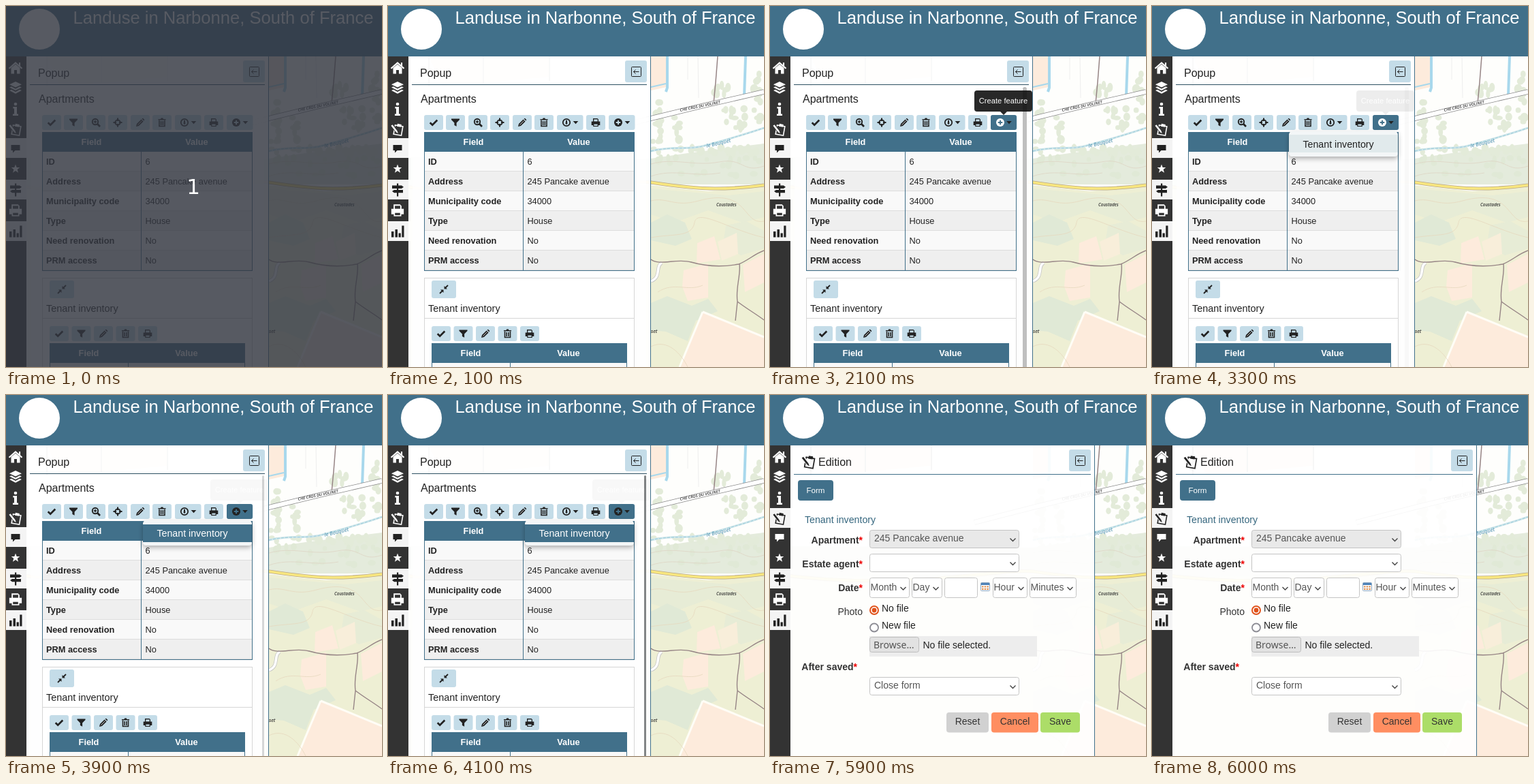
Recreate the animation shown at these times as an HTML page. Size 552 by 530 pixels, loop 8000 ms.

```html
<!DOCTYPE html>
<html lang="en">
<head>
<meta charset="utf-8">
<title>Tenant inventory form</title>
<style>
html, body { margin: 0; width: 100%; height: 100%; overflow: hidden; background: #fff; }
svg { display: block; width: 100%; height: 100%; font-family: "Liberation Sans", Arial, sans-serif; }
</style>
</head>
<body>
<svg id="stage" viewBox="0 0 552 530"></svg>
<script>
const BLUE = '#41708a', PALE = '#c4dce8', INK = '#222', SIDE = '#333';
const LOOP = 8000, STEP = 100;
const ADDRESS = '245 Pancake avenue';

let seed = 7;
const rand = () => (seed = seed * 16807 % 2147483647) / 2147483647;

const rect = (x, y, x2, y2, fill, extra = '') =>
  `<rect x="${x}" y="${y}" width="${x2 - x}" height="${y2 - y}" fill="${fill}" ${extra}/>`;
const frame = (x, y, x2, y2, fill, stroke, r = 0) =>
  rect(x + .5, y + .5, x2 - .5, y2 - .5, fill, `stroke="${stroke}" rx="${r}"`);
const text = (s, x, y, size, fill = INK, extra = '') =>
  `<text x="${x}" y="${y}" font-size="${size}" fill="${fill}" ${extra}>${s}</text>`;
const area = (d, fill) => `<path d="${d}" fill="${fill}"/>`;
const line = (d, color, w = 1, extra = '') =>
  `<path d="${d}" fill="none" stroke="${color}" stroke-width="${w}" ${extra}/>`;
const group = (id, body, extra = '') => `<g id="${id}" ${extra}>${body}</g>`;
const BOLD = 'font-weight="bold"', MID = 'text-anchor="middle"', END = 'text-anchor="end"';

// Icons are drawn around 0,0; c is the ink, b the colour behind it
const icons = {
  check: c => line('M-5.3 .2L-1.8 3.6L5.3-3.5', c, 2.7),
  filter: c => area('M-6-5.5H6V-4L1.6 .6V5.8L-1.6 4V.6L-6-4Z', c),
  zoom: c => line('M2 2L6 6', c, 2.6) + `<circle cx="-1" cy="-1" r="4.2" fill="none" stroke="${c}" stroke-width="1.9"/>` +
    line('M-3.2-1H1.2M-1-3.2V1.2', c, 1.4),
  target: c => `<circle r="3.7" fill="none" stroke="${c}" stroke-width="1.8"/>` +
    line('M-6.5 0H-2M2 0H6.5M0-6.5V-2M0 2V6.5', c, 2),
  pencil: c => area('M-6 6L-5 2L1.6-4.6L4.6-1.6L-2 5ZM2.5-5.4L4-6.3L6.3-4L5.4-2.5Z', c) + line('M-3.6 3.6L2.4-2.4', '#fff', .8),
  trash: c => area('M-5.5-5H-2L-1.4-6.4H1.4L2-5H5.5V-3.5H-5.5Z', c) +
    line('M-4-3V5.5H4V-3M-1.4-2V4M1.4-2V4', c, 1.6),
  clock: c => `<circle r="5.2" fill="none" stroke="${c}" stroke-width="1.8"/>` +
    line('M0-3.2V2', c, 2) + area('M-2 .5H2L0 3.2Z', c),
  print: (c, b) => area('M-4-6H2.5L4-4.5V-1H-4ZM-6.3-1.5H6.3V4H-6.3Z', c) +
    rect(-2.7, -4.6, 2.7, -1.6, b) + rect(-3.8, 1.8, 3.8, 6, c) + rect(-2.6, 2.6, 2.6, 4.9, b),
  plus: (c, b) => `<circle r="6" fill="${c}"/>` + line('M-3.3 0H3.3M0-3.3V3.3', b, 1.9),
  caret: c => area('M-3.8-2H3.8L0 2.2Z', c),
  shrink: c => line('M-6 6L-2 2M6-6L2-2', c, 1.8) + area('M-5 .5H-.5V5ZM5-.5H.5V-5Z', c),
  home: c => line('M-9.5 .8L0-7.6L9.5 .8M6-8V-3', c, 2.1) +
    area('M-6.5 0L0-5.5L6.5 0V8.5H2V3H-2V8.5H-6.5Z', c),
  layers: c => area('M0-9L9-4.7L0-.4L-9-4.7Z', c) +
    area('M-9-.6L-6-1.8L0 1.4L6-1.8L9-.6L0 4ZM-9 4L-6 2.8L0 6L6 2.8L9 4L0 8.8Z', c),
  info: c => `<circle cy="-8" r="2.3" fill="${c}"/>` + area('M-3.6-4H2V6.5H4V9H-4V6.5H-2V-1.6H-3.6Z', c),
  edit: (c, b) => `<g transform="rotate(10)">${line('M-4.5-5.5H7V8H-4.5Z', c, 1.6) + rect(-1.5, -8, 4.5, -4, c)}</g>` +
    line('M-8.5-6.5L.5 5', b, 4.6) + line('M-8.5-6L-1.5 3', c, 2.6) + area('M-2.6 3.9L-.4 2.2L.8 6Z', c),
  comment: c => area('M-6.5-5H6.5V3H-.5L-4 6.5V3H-6.5Z', c),
  star: c => area('M0-6.5L1.7-2H6.3L2.7 .9L4 5.7L0 2.9L-4 5.7L-2.7 .9L-6.3-2H-1.7Z', c),
  sign: c => rect(-1, -9.5, 1.2, 9.5, c) + area('M-8-6.5H6L9-4.3L6-2H-8ZM8 0H-5L-8 2L-5 4.2H8Z', c),
  bars: c => rect(-9, 0, -5.5, 8.5, c) + rect(-3.5, -3, 0, 8.5, c) + rect(1.5, 2.5, 4.8, 8.5, c) + rect(6.3, -8.5, 9.5, 8.5, c)
};
const icon = (name, x, y, c = INK, b = PALE, k = 1) =>
  `<g transform="translate(${x} ${y}) scale(${k})">${icons[name](c, b)}</g>`;

const trees = (x, y, w, h, n, fill) => Array.from({ length: n }, () =>
  `<ellipse cx="${(x + rand() * w).toFixed(1)}" cy="${(y + rand() * h).toFixed(1)}" rx="${(3 + rand() * 3).toFixed(1)}" ry="${(3 + rand() * 4).toFixed(1)}" fill="${fill}"/>`).join('');

function map() {
  const green = '#e0e9d6', leaf = '#e3ebd9', peach = '#fdebdc', brown = '#968485';
  const yellow = 'M0 262C200 290 330 254 386 259C420 264 450 268 480 268S530 266 552 263';
  const street = 'M300 187L386 165L460 147L552 126';
  const stream = 'M386 213C420 205 440 212 465 205S520 190 552 179';
  const label = (s, x, y, a, size, fill) =>
    text(s, x, y, size, fill, `font-family="Open Sans, sans-serif" font-style="italic" font-weight="600" transform="rotate(${a} ${x} ${y})"`);
  return rect(0, 74, 552, 530, '#fefefc') +
    area('M386 74H409V119L386 124Z', peach) +
    area('M60 74H236V104L80 118Z', peach) +
    line('M237 74V110M60 74V118M140 74V113', '#9a9a9a', 2) +
    area('M0 222L386 224L440 216L552 202V262L386 262L0 270Z', '#e4ebdc') +
    area('M0 268L386 263L470 272L552 264V530H0Z', '#eeefd4') +
    area('M386 268L440 273L500 278L552 272V310L520 318L470 300L420 318L386 306Z', '#e7ecd6') +
    area('M386 318L410 306L436 318L446 342L422 352L386 344Z', green) +
    area('M386 436L410 426L446 440L470 430L484 448L452 462L440 492L408 478L386 476Z', green) +
    area('M496 322L526 316L552 330V356L518 366L492 350Z', '#e7ecd6') +
    area('M454 348L479 338L488 372L453 378Z', peach) +
    area('M484 346L512 333L514 364L490 374Z', '#f8eeda') +
    area('M434 388L470 378V428L440 433L432 412Z', peach) +
    area('M521 380L552 364V406L524 420Z', peach) +
    area('M462 449L552 484V530H430Z', peach) +
    line('M462 449L552 486M462 449L428 530', '#fffdf6', 3) +
    trees(389, 138, 12, 66, 18, leaf) + trees(420, 164, 8, 36, 9, leaf) +
    trees(478, 116, 24, 14, 9, leaf) + trees(535, 98, 13, 76, 14, leaf) +
    trees(490, 150, 34, 30, 16, leaf) + trees(390, 208, 158, 10, 26, leaf) +
    trees(392, 222, 154, 28, 20, green) +
    line('M410 74V120L408 126M525 74L523 131', '#a8d8ec', 4) +
    line('M386 119L408 114', '#a8d8ec', 2) +
    line('M484 74L481 112L478 143', brown, 1.5) +
    line(street, '#8a8a8a', 7.5) + line(street, '#fff', 6) +
    line('M440 74V108M456 135L455 74', '#eee') +
    line(stream, '#cfe6ea', 3) + line(stream, '#a9d3df', 1.4, 'stroke-dasharray="4 2"') +
    line('M386 232C420 222 450 236 486 229S520 246 552 235M386 250C420 238 450 252 488 245', '#ddd5c4', .8) +
    line(yellow, '#b8a888', 5.2) + line(yellow, '#f8e67f', 3.6) +
    line('M386 286C410 280 420 296 456 286S510 284 522 298S538 318 552 316M386 340C420 334 446 340 450 318S500 328 552 340M386 500C410 488 430 510 440 530M396 420C420 404 440 420 462 410', '#e6d9be', .8) +
    line('M386 404C402 398 392 382 402 377', '#c4c4c4', 5) + line('M386 404C402 398 392 382 402 377', '#fff', 3.5) +
    line('M386 372C398 382 424 370 445 376S488 384 515 379C528 374 538 364 552 359M516 379C518 396 510 414 513 434C526 444 540 452 552 461M513 434L510 462', brown, 1.4) +
    label('CHE CROS DU VOLINET', 429, 155, -11.5, 5.9, '#333') +
    label('le Bouquet', 468, 208, -13, 7.5, '#6ba3bd') +
    label('Coustades', 482, 294, 0, 6.3, '#333') +
    label('set', 386, 480, 0, 7, '#333');
}

const sideIcons = ['home', 'layers', 'info', 'edit', 'comment', 'star', 'sign', 'print', 'bars'];
const sideY = [91, 120, 152, 181, 209, 239, 270, 300, 331];
const sidebar = lit => rect(0, 74, 30, 530, SIDE) + sideIcons.map((name, i) => {
  const on = lit.includes(name), y = sideY[i];
  return (on ? rect(0, y - 15, 30, y + 14, '#f4f4f4') : '') +
    icon(name, 14, y, on ? INK : '#fff', on ? '#f4f4f4' : SIDE, name == 'print' ? 1.45 : 1);
}).join('');

const button = (x, y, x2, y2, name, drop) => rect(x, y, x2, y2, PALE, 'rx="3"') +
  icon(name, drop ? x + 14 : (x + x2) / 2, (y + y2) / 2) + (drop ? icon('caret', x2 - 11, (y + y2) / 2) : '');
const backButton = x => rect(x, 80, x + 32, 112, PALE, 'rx="3"') +
  frame(x + 9, 89, x + 24, 104, 'none', INK, 1) + line(`M${x + 20.5} 96.5H${x + 12.5}M${x + 15.5} 93.5L${x + 12.5} 96.5L${x + 15.5} 99.5`, INK);

function tableHead(x, x2, y, col) {
  const head = (s, a, b) => text(s, (a + b) / 2, y + 19, 12.8, '#fff', BOLD + ' ' + MID);
  return rect(x, y, x2, y + 29, BLUE) + head('Field', x, col) + head('Value', col, x2);
}

function popup() {
  const rows = [['ID', '6'], ['Address', ADDRESS], ['Municipality code', '34000'], ['Type', 'House'],
    ['Need renovation', 'No'], ['PRM access', 'No']];
  const tools = [['check', 53], ['filter', 85], ['zoom', 118], ['target', 150], ['pencil', 183], ['trash', 215],
    ['clock', 248, 1], ['print', 291], ['plus', 324, 1]];
  const body = rows.map(([a, b], i) => {
    const y = 214 + i * 29;
    return rect(53, y, 362, y + 29, i % 2 ? '#efefef' : '#f9f9f9') + rect(53, y + 28, 362, y + 29, '#ddd') +
      text(a, 59, y + 19, 12.8, INK, BOLD) + text(b, 204.5, y + 19, 12.8);
  }).join('');
  return rect(30, 74, 386, 530, '#fff', 'opacity=".94"') + rect(36, 118, 379, 530, '#fff', 'opacity=".7"') +
    rect(385, 74, 386, 530, BLUE) +
    text('Popup', 47, 104, 16) + rect(35, 115, 380, 116, '#2d5062') + backButton(348) +
    text('Apartments', 48, 142, 16) +
    tools.map(([n, x, d]) => button(x, 160, x + (d ? 38.5 : 28), 182, n, d)).join('') +
    body + rect(198, 214, 199, 388, BLUE) + tableHead(53, 362, 185, 198) + frame(53, 185, 362, 389, 'none', BLUE) +
    frame(53, 399, 362, 540, '#fff', '#d6d6d6') + button(64, 403, 100, 429, 'shrink') +
    text('Tenant inventory', 59, 449, 14.4) + rect(53, 458, 362, 459, '#d6d6d6') +
    ['check', 'filter', 'pencil', 'trash', 'print'].map((n, i) => button(64 + i * 32.5, 470, 92 + i * 32.5, 492, n)).join('') +
    rect(64, 524, 351, 530, '#f9f9f9') + rect(179, 524, 180, 530, BLUE) + tableHead(64, 351, 495, 179) +
    frame(64, 495, 351, 540, 'none', BLUE);
}

function overlays() {
  const plus = (id, c) => group(id, icon('plus', 338, 171, c, BLUE));
  return group('wide', rect(371, 119, 377, 540, '#bfbfbf', 'rx="3"')) +
    group('thin', rect(376, 118, 379, 540, '#828586', 'rx="1.5"')) +
    group('active', rect(324, 160, 362, 182, BLUE, 'rx="3"') + plus('plusLight', '#fff') + plus('plusDark', INK) + icon('caret', 351, 171)) +
    group('menu', rect(201, 184, 361, 221, '#f3f6f7', 'rx="5" filter="url(#shade)"') +
      group('itemIdle', rect(201, 189, 361, 215, '#e1eaec') + text('Tenant inventory', 221.5, 208, 14.2)) +
      group('itemOn', rect(201, 190, 361, 216, BLUE) + text('Tenant inventory', 221.5, 208, 14.2, '#fff'))) +
    group('tip', rect(300, 124, 385, 155, '#111', 'rx="4"') + area('M338 155H348L343 160Z', '#111') +
      text('Create feature', 342.5, 143, 11.2, '#fff', MID));
}

function form() {
  const chevron = (x, y) => line(`M${x - 4} ${y - 2}l4 4l4-4`, '#444', 1.4);
  const select = (x, y, x2, y2, s, base, pad = 7, fill = '#fff') => frame(x, y, x2, y2, fill, '#c4c4c4', 3) +
    text(s, x + pad, base, 14, '#555') + chevron(x2 - 9.5, (y + y2) / 2 + 1);
  const label = (s, y, x = 136) => text(`${s}<tspan fill="#e00">*</tspan>`, x, y, 14, '#333', BOLD + ' ' + END);
  const action = (s, x, x2, fill) => rect(x, 466, x2, 495.5, fill, 'rx="4"') + text(s, (x + x2) / 2, 484, 14, '#333', MID);
  return rect(30, 74, 477, 530, '#fff', 'opacity=".92"') + rect(476, 74, 477, 530, BLUE) +
    icon('edit', 57, 98, INK, '#fff', 1.08) + text('Edition', 71, 104, 16) + rect(35, 116, 471, 117, BLUE) + backButton(439) +
    rect(41, 125, 93, 155, BLUE, 'rx="4"') + text('Form', 67, 144, 11.6, '#fff', MID) +
    text('Tenant inventory', 51, 188, 14.2, '#36677f') +
    label('Apartment', 218) + select(146, 198, 366, 225, ADDRESS, 215, 7, '#e9e9e9') +
    label('Estate agent', 253) + select(146, 233, 366, 260, '', 251) +
    label('Date', 288) + select(146, 268, 205, 298, 'Month', 287, 1.5) + select(208, 268, 253, 298, 'Day', 287, 1.5) +
    frame(256, 268, 305, 298, '#fff', '#c4c4c4', 3) +
    frame(309, 275, 323, 288, '#fff', '#8aa5c0', 1) + rect(310, 276, 322, 279, '#4f83b8') +
    line('M311 281.5H321M311 285H321', '#d98a4a', 2, 'stroke-dasharray="2.5 1.2"') +
    select(327, 268, 378, 298, 'Hour', 287, 1.5) + select(381, 268, 450, 298, 'Minutes', 287, 1.5) +
    text('Photo', 136, 323, 14, '#333', END) +
    `<circle cx="153" cy="316" r="6" fill="#fff" stroke="#e0531c" stroke-width="2"/><circle cx="153" cy="316" r="3.4" fill="#e0531c"/>` +
    `<circle cx="153" cy="341.5" r="6" fill="#fff" stroke="#8c8c94" stroke-width="1.8"/>` +
    text('No file', 164, 318, 14) + text('New file', 164, 343, 14) +
    rect(146, 354, 392, 384, '#ededed') + frame(146, 355, 219, 378, '#e2e2e2', '#bdbdbd', 3) +
    text('Browse…', 152, 372, 14, '#555', 'font-family="Noto Sans, sans-serif"') + text('No file selected.', 224.5, 372, 14) +
    label('After saved', 404, 128) + select(146, 414, 366, 441, 'Close form', 431) +
    action('Reset', 259, 321, '#d1d1d1') + action('Cancel', 325, 394, '#ff8e61') + action('Save', 397, 455, '#acdd68');
}

const stage = document.getElementById('stage');
stage.innerHTML =
  '<defs><filter id="shade" x="-10%" y="-30%" width="120%" height="180%"><feDropShadow dx="0" dy="3" stdDeviation="3.5" flood-opacity=".3"/></filter>' +
  '<clipPath id="pane"><path d="M0 74H386V530H0Z"/></clipPath></defs>' +
  map() + rect(0, 0, 552, 74, BLUE) + '<circle cx="49" cy="34" r="30" fill="#fff"/>' +
  text('Landuse in Narbonne, South of France', 98.5, 26, 25.6, '#fff') +
  group('popup', sidebar(['comment', 'sign', 'bars']) + popup() + overlays(), 'clip-path="url(#pane)"') +
  group('form', sidebar(['edit', 'sign', 'bars']) + form()) +
  group('intro', rect(0, 0, 552, 530, '#323640', 'opacity=".82"') +
    text('1', 275, 276, 31, '#fff', MID + ' font-family="DejaVu Sans, sans-serif"'));

const parts = {};
stage.querySelectorAll('g[id]').forEach(g => parts[g.id] = g);
const show = (id, a) => {
  parts[id].style.display = a > 0 ? '' : 'none';
  parts[id].style.opacity = a;
};
const ramp = (t, a, b) => Math.min(1, Math.max(0, (t - a) / (b - a)));

function draw(ms) {
  const t = Math.floor(ms % LOOP / STEP) * STEP;
  show('intro', +(t < 100));
  show('popup', +(t < 5800));
  show('form', +(t >= 5800));
  show('wide', t < 1700 ? 0 : 1 - ramp(t, 3100, 3320));
  show('thin', ramp(t, 3800, 4100));
  show('active', +(t >= 1800));
  show('plusLight', +(t < 3900));
  show('plusDark', +(t >= 3900));
  show('tip', t < 3100 ? ramp(t, 1800, 2100) * .9 : t < 3200 ? .9 : t < 3300 ? .45 : t < 3500 ? .07 : .025);
  show('menu', ramp(t, 3100, 3200));
  show('itemIdle', +(t < 3900));
  show('itemOn', +(t >= 3900));
}

const start = performance.now();
(function tick() {
  draw(performance.now() - start);
  requestAnimationFrame(tick);
})();
</script>
</body>
</html>
```
